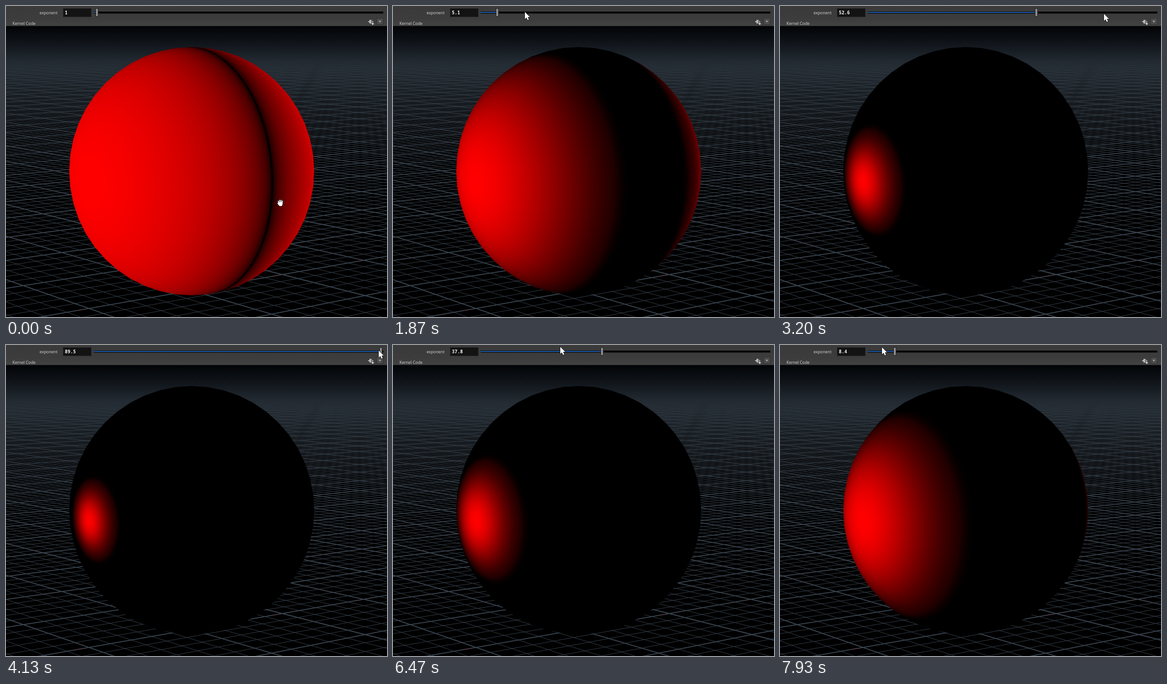
These frames come from a looping animation (829 by 675 pixels, 8 s). An HTML page with a canvas:

```html
<!DOCTYPE html>
<html lang="en">
<head>
<meta charset="utf-8">
<title>Exponent shading</title>
<style>
  html, body { margin: 0; width: 100%; height: 100%; overflow: hidden; background: #000; }
  canvas { display: block; }
</style>
</head>
<body>
<canvas id="stage" width="829" height="675"></canvas>
<script>
const W = 829, H = 675, TOP = 44, LOOP = 8000, FPS = 15;
const ctx = document.getElementById('stage').getContext('2d');

// Camera: distance in sphere radii, pitch and azimuth
const DIST = 10.3, PITCH = 0.1324, AZIM = 0.9128;
const SIN_P = Math.sin(PITCH), COS_P = Math.cos(PITCH);
const SIN_A = Math.sin(AZIM), COS_A = Math.cos(AZIM);
const RIM = Math.sqrt(DIST * DIST - 1);
const BALL = { x: 404, y: 358.5, rx: 266.5, ry: 269.5 };
const FOCAL = BALL.ry * RIM;

// The viewport redraws one step after the slider
const VIEW_LAG = 1000 / FPS;

// [time, value] and [time, x, y]
const EXPONENT = [
  [0, 1], [1400, 1], [1600, 2.2], [1867, 5.1], [2267, 13], [2733, 31], [3133, 52], [3200, 52.6],
  [3600, 75], [3933, 88], [4067, 89], [4200, 90], [4530, 90], [4800, 84],
  [5133, 67], [5200, 60.3], [5400, 60], [5800, 50], [6200, 38.1], [6467, 37.8], [6667, 34.5],
  [7067, 25.5], [7467, 18.5], [7933, 8.4]
];
const POINTER = [
  [0, 597, 427], [67, 597, 427], [200, 450, 250], [400, 200, 14], [600, 200, 14],
  [1000, 202, 15], [1400, 206, 13], [1867, 287, 13], [2267, 400, 14], [3133, 688, 16],
  [3200, 705, 17], [3700, 810, 12], [4530, 812, 12], [5200, 601, 14], [5400, 580, 12],
  [6200, 392, 6], [6467, 364, 4], [7067, 300, 3], [7467, 254, 3], [7933, 222, 5]
];

function sample(keys, t, col = 1) {
  let i = 1;
  while (i < keys.length - 1 && keys[i][0] < t) i++;
  const a = keys[i - 1], b = keys[i];
  const f = Math.min(1, Math.max(0, (t - a[0]) / (b[0] - a[0])));
  return a[col] + (b[col] - a[col]) * f;
}

function exponentAt(t) {
  return Math.round(sample(EXPONENT, t) * 10) / 10;
}

function layer(w, h) {
  const c = document.createElement('canvas');
  c.width = w;
  c.height = h;
  return c;
}

function vGradient(g, y0, y1, stops) {
  const grad = g.createLinearGradient(0, y0, 0, y1);
  for (const [y, color] of stops) grad.addColorStop((y - y0) / (y1 - y0), color);
  return grad;
}

function box(g, x, y, w, h, fill) {
  g.fillStyle = fill;
  g.fillRect(x, y, w, h);
}

// ---- floor grid ----
function project(u, v) {
  const side = v * COS_A - u * SIN_A;
  const near = u * COS_A + v * SIN_A;
  const depth = DIST + SIN_P - near * COS_P;
  return [403 + FOCAL * side / depth, 355 + FOCAL * (COS_P + near * SIN_P) / depth];
}

function gridLine(g, k, alongU) {
  const [c, s] = alongU ? [COS_A, SIN_A] : [SIN_A, COS_A];
  const near = (7.4 - k * s) / c;
  for (const [i, end] of [near, near - 150].entries()) {
    const p = alongU ? project(end, k) : project(k, end);
    i ? g.lineTo(...p) : g.moveTo(...p);
  }
}

function drawFloor(g) {
  box(g, 0, 0, W, H, '#000');
  const minor = vGradient(g, TOP, H, [
    [TOP, 'rgba(52,62,72,.35)'], [200, 'rgba(52,62,72,.48)'],
    [330, 'rgba(52,62,72,.82)'], [480, 'rgba(52,62,72,1)'], [H, 'rgba(52,62,72,1)']
  ]);
  const major = vGradient(g, TOP, H, [
    [TOP, 'rgba(56,67,78,.4)'], [300, 'rgba(56,67,78,.8)'], [480, 'rgb(56,67,78)'], [H, 'rgb(56,67,78)']
  ]);
  for (let n = -300; n <= 30; n++) {
    const bold = n % 5 === 0;
    g.strokeStyle = bold ? major : minor;
    g.lineWidth = bold ? 2 : 1;
    g.beginPath();
    gridLine(g, n / 5, true);
    gridLine(g, n / 5, false);
    g.stroke();
  }
  // glimpses of the red axis
  g.strokeStyle = 'rgba(110,45,45,.7)';
  g.lineWidth = 1;
  for (const u of [1.08, -0.93, -1.95]) {
    g.beginPath();
    g.moveTo(...project(u + .04, 0));
    g.lineTo(...project(u - .04, 0));
    g.stroke();
  }
  box(g, 0, TOP, W, 200, vGradient(g, TOP, 244, [
    [TOP, 'rgb(2,4,6)'], [62, 'rgb(9,12,16)'], [95, 'rgb(22,28,34)'],
    [118, 'rgba(33,40,48,.97)'], [142, 'rgba(36,44,52,.5)'],
    [175, 'rgba(36,44,52,.14)'], [244, 'rgba(36,44,52,0)']
  ]));
}

// ---- header ----
function label(g, text, x, y) {
  g.font = '8.8px "Noto Sans", sans-serif';
  g.fillStyle = '#cccccc';
  g.fillText(text, x, y);
}

function drawHeader(g) {
  box(g, 0, 0, W, TOP, vGradient(g, 0, TOP, [[0, '#3a3a3a'], [27, '#3c3c3c'], [TOP, '#424242']]));
  box(g, 0, 43, W, 1, '#202224');
  label(g, 'exponent', 73, 17.5);
  label(g, 'Kernel Code', 14, 41);
  box(g, 124, 5, 62, 19, '#222222');
  box(g, 125, 6, 60, 17, '#131313');
  box(g, 191, 12, 630, 5, '#262626');
  box(g, 191, 12, 630, 4, '#060606');

  // small slider icon and menu button
  box(g, 788, 33, 5, 2, '#c8c8c8');
  box(g, 791, 30, 3, 8, '#c8c8c8');
  box(g, 795, 30, 1, 8, '#c8c8c8');
  box(g, 797, 33, 2, 2, '#c8c8c8');
  box(g, 795, 38, 6, 1, '#dddddd');
  box(g, 797, 36, 2, 5, '#dddddd');
  box(g, 806, 26, 15, 15, '#2f2f2f');
  box(g, 807, 27, 13, 13, '#4c4c4c');
  g.fillStyle = '#a0a0a0';
  g.beginPath();
  g.moveTo(810.5, 32);
  g.lineTo(816.5, 32);
  g.lineTo(813.5, 36);
  g.fill();
}

function drawSlider(e) {
  const x = Math.round(191 + 6.985 * e);
  box(ctx, 191, 13, x - 191, 2, '#1c61b8');
  box(ctx, x - 3, 5, 6, 18, '#1c1c1c');
  box(ctx, x - 2, 6, 4, 16, '#858585');
  box(ctx, x - 2, 6, 1, 16, '#b4b4b4');
  ctx.font = 'bold 10px "Noto Sans Mono", monospace';
  ctx.fillStyle = '#f2f2f2';
  ctx.fillText(String(e), 128, 17.5);
}

// ---- sphere ----
const SIZE = 542, LEVELS = 8192, SIDES = 48;
const ballLayer = layer(SIZE, SIZE), ballCtx = ballLayer.getContext('2d');
const ballImage = ballCtx.createImageData(SIZE, SIZE);
const ballPixels = new Uint32Array(ballImage.data.buffer);
const dots = new Uint16Array(SIZE * SIZE);
const shades = new Uint32Array(LEVELS + 1);
const ballLeft = Math.round(BALL.x - SIZE / 2), ballTop = Math.round(BALL.y - SIZE / 2);
let shownExponent = null;

// |n . axis| for every pixel, seen in perspective
function measureBall() {
  for (let j = 0; j < SIZE; j++) {
    for (let i = 0; i < SIZE; i++) {
      let x = (ballLeft + i + .5 - BALL.x) / BALL.rx;
      let y = (BALL.y - ballTop - j - .5) / BALL.ry;
      const r = Math.hypot(x, y);
      if (r > .9999) { x *= .9999 / r; y *= .9999 / r; }
      const k = (x * x + y * y) / (RIM * RIM);
      const root = Math.max(0, k * k * DIST * DIST - (1 + k) * (k * DIST * DIST - 1));
      const z = (k * DIST + Math.sqrt(root)) / (1 + k);
      const s = (DIST - z) / RIM;
      const dot = -x * s * SIN_A - y * s * COS_A * SIN_P + z * COS_A * COS_P;
      dots[j * SIZE + i] = Math.min(1, Math.abs(dot)) * LEVELS;
    }
  }
}

// sRGB curve with a soft toe into black
function toDisplay(v) {
  const s = v < .0031308 ? 12.92 * v : 1.055 * Math.pow(v, 1 / 2.4) - .055;
  return s * Math.min(1, Math.max(0, (s - .04) / .08));
}

function shadeBall(e) {
  for (let i = 0; i <= LEVELS; i++) {
    const red = Math.round(toDisplay(Math.pow(i / LEVELS, e)) * 255);
    shades[i] = (0xff000000 | red) >>> 0;
  }
  for (let i = 0; i < dots.length; i++) ballPixels[i] = shades[dots[i]];
  ballCtx.putImageData(ballImage, 0, 0);
  shownExponent = e;
}

function drawBall(e) {
  if (e !== shownExponent) shadeBall(e);
  ctx.save();
  ctx.beginPath();
  for (let i = 0; i < SIDES; i++) {
    const a = i * 2 * Math.PI / SIDES;
    ctx.lineTo(BALL.x + BALL.rx * Math.sin(a), BALL.y - BALL.ry * Math.cos(a));
  }
  ctx.closePath();
  ctx.clip();
  ctx.drawImage(ballLayer, ballLeft, ballTop);
  ctx.restore();
}

// ---- pointers ----
const ARROW = new Path2D('M0 0V15.2L3.4 12L6 17.6L8.6 16.5L6.2 11H10.8Z');
const FINGERS = new Path2D('M-3.6 0L-4.6 -3.6M-1.2 -1L-1.6 -5.6M1.4 -1L1.6 -5.6M3.8 0L4.6 -3.8M-3 4L-5.6 1.2');
const PALM = new Path2D('M-4.4 -1H4.8L4.4 4L3 7H-2L-4.4 3.5Z');

function drawPointer(x, y) {
  ctx.save();
  ctx.translate(Math.round(x), Math.round(y));
  ctx.lineCap = ctx.lineJoin = 'round';
  if (y > TOP) {
    for (const [color, grow] of [['#000', 1.6], ['#fff', 0]]) {
      ctx.strokeStyle = ctx.fillStyle = color;
      ctx.lineWidth = 2 + grow;
      ctx.stroke(FINGERS);
      ctx.lineWidth = .5 + grow;
      ctx.stroke(PALM);
      ctx.fill(PALM);
    }
  } else {
    ctx.strokeStyle = '#101010';
    ctx.lineWidth = 1.6;
    ctx.stroke(ARROW);
    ctx.fillStyle = '#fff';
    ctx.fill(ARROW);
  }
  ctx.restore();
}

const backdrop = layer(W, H);
drawFloor(backdrop.getContext('2d'));
drawHeader(backdrop.getContext('2d'));
measureBall();

function draw(now) {
  const step = Math.floor((now % LOOP) * FPS / 1000 + .1);
  const t = step * 1000 / FPS;
  ctx.drawImage(backdrop, 0, 0);
  drawBall(exponentAt(t - VIEW_LAG));
  drawSlider(exponentAt(t));
  drawPointer(sample(POINTER, t, 1), sample(POINTER, t, 2));
}

let start = null;
function tick(now) {
  if (start === null) start = now;
  draw(now - start);
  requestAnimationFrame(tick);
}
draw(0);
requestAnimationFrame(tick);
</script>
</body>
</html>
```
